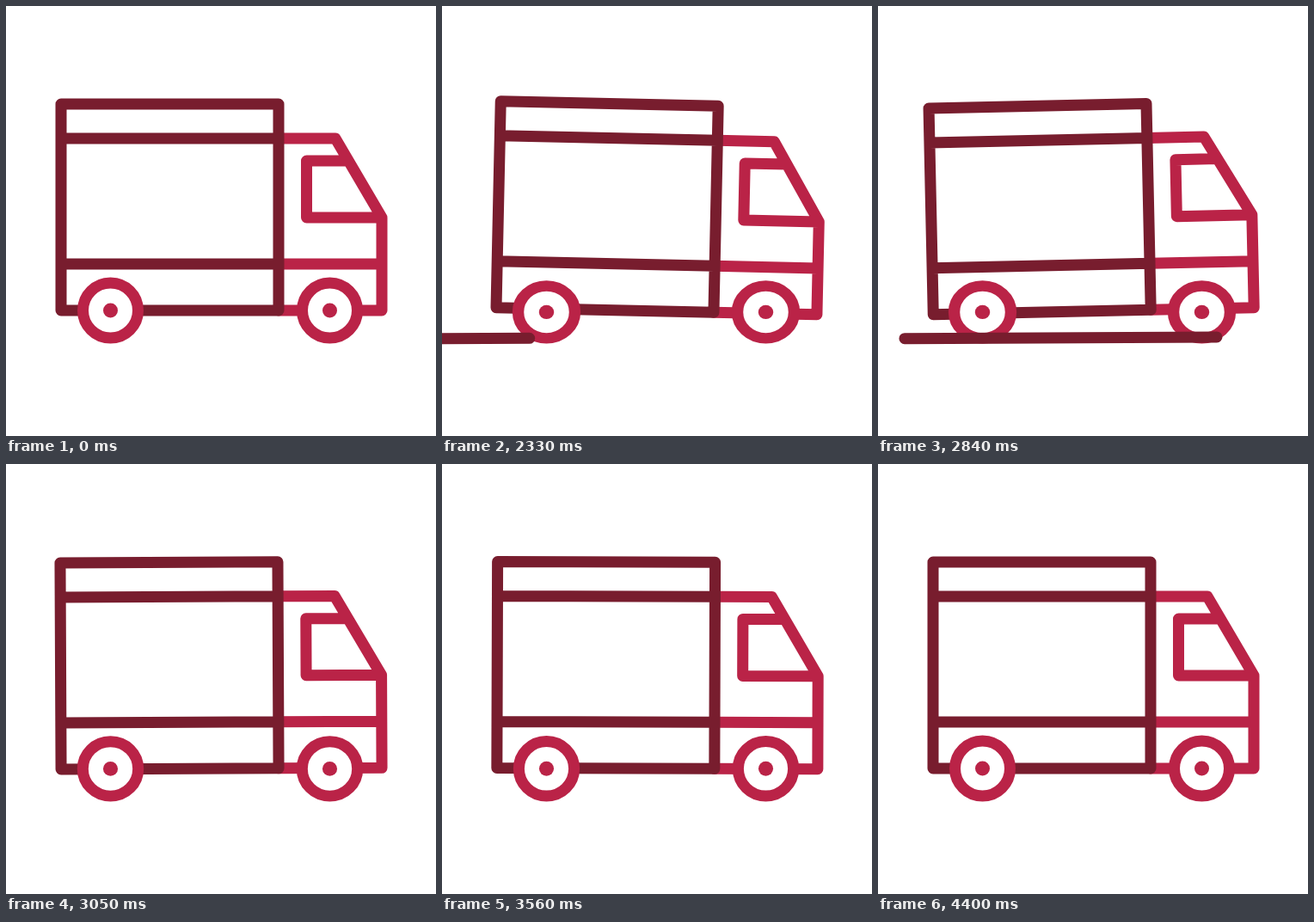
An HTML page that plays this animation: 500x500 px, repeating every 4490 ms.

```html
<!DOCTYPE html>
<html lang="en">
<head>
<meta charset="utf-8">
<title>Delivery truck</title>
<style>
  html, body { margin: 0; width: 100%; height: 100%; overflow: hidden; background: #fff; }
  svg { display: block; width: 100%; height: 100%; }
  .dark, .red { fill: none; stroke-width: 13; stroke-linecap: round; stroke-linejoin: round; }
  .dark { stroke: #781d2e; }
  .red { stroke: #ba2347; }
  .wheel .red { fill: #fff; }
  .hub { fill: #ba2347; }
</style>
</head>
<body>
<svg viewBox="0 0 500 500">
  <g id="body">
    <path class="red" d="M317 154H383L437 246V354H317M317 300H437M398 180H349.5V246H437"/>
    <path class="dark" d="M64 114H317V354H64ZM64 154H317M64 300H317"/>
  </g>
  <g class="wheel"><circle class="red" cx="121.5" cy="354" r="32"/><circle class="hub" cx="121.5" cy="354" r="8.5"/></g>
  <g class="wheel"><circle class="red" cx="376.5" cy="354" r="32"/><circle class="hub" cx="376.5" cy="354" r="8.5"/></g>
  <path id="road" class="dark"/>
</svg>
<script>
const LOOP = 4490, STEP = 30;
const TILT = 1.25;
// Tilt keys: [time, share of the full tilt]
const tiltKeys = [[2000, 0], [2333, 1], [2833, -1], [3333, 1], [3833, -1], [4333, 0]];
// The road sweeps right to left; its tail follows its head after LAG
const roadStarts = [2003, 2617, 3155];
const ROAD_FROM = 510, ROAD_TO = -60, SWEEP = 302, LAG = 133;

const body = document.getElementById('body');
const road = document.getElementById('road');
const wheels = document.querySelectorAll('.wheel');

function ease(p) {
  p = Math.min(1, Math.max(0, p));
  return (1 - Math.cos(Math.PI * p)) / 2;
}

function tiltAt(t) {
  let value = 0;
  for (let i = 1; i < tiltKeys.length; i++) {
    const [t0, a] = tiltKeys[i - 1], [t1, b] = tiltKeys[i];
    value += (b - a) * ease((t - t0) / (t1 - t0));
  }
  return value;
}

function roadPoint(elapsed) {
  const x = ROAD_FROM + (ROAD_TO - ROAD_FROM) * ease(elapsed / SWEEP);
  return `${x} ${386.8 - 0.0048 * x}`;
}

function draw(t) {
  const tilt = tiltAt(t), squash = Math.abs(tilt);
  body.setAttribute('transform',
    `translate(${-0.4 * squash} ${0.8 * squash}) rotate(${TILT * tilt} 250 325)`);

  wheels.forEach((wheel, i) => {
    const x = i ? 376.5 : 121.5;
    wheel.setAttribute('transform',
      `translate(${x} 392.5) scale(${1 + 0.03 * squash} ${1 - 0.05 * squash}) translate(${-x} -392.5)`);
  });

  const start = roadStarts.filter(s => s <= t).pop() ?? roadStarts[0];
  road.setAttribute('d', `M${roadPoint(t - start)}L${roadPoint(t - start - LAG)}`);
}

function tick() {
  const t = performance.now() % LOOP;
  draw(Math.floor((t + 10) / STEP) * STEP - 10);
  requestAnimationFrame(tick);
}
tick();
</script>
</body>
</html>
```
